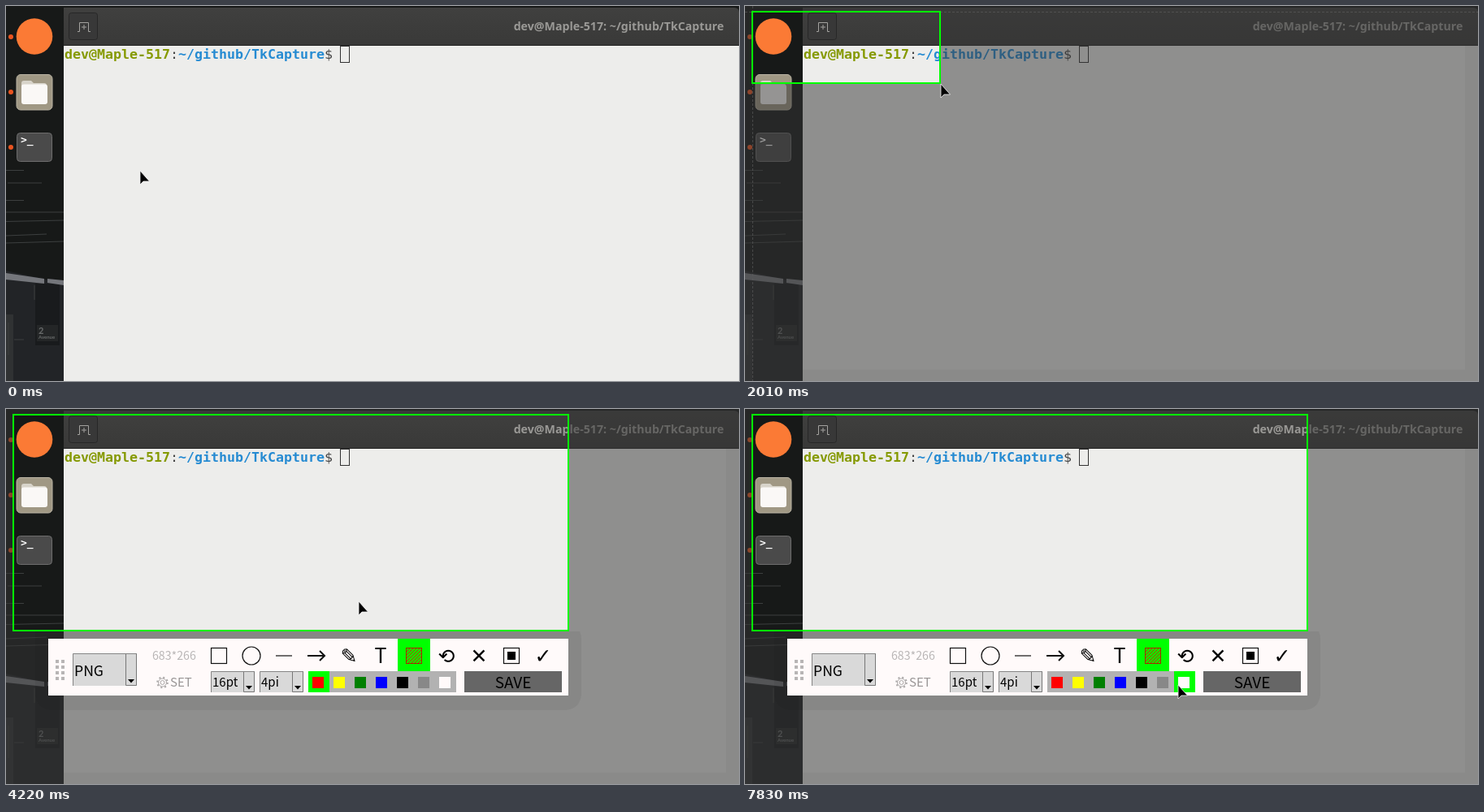
An HTML page that plays this animation: 902x462 px, repeating every 8000 ms.

```html
<!DOCTYPE html>
<html lang="en">
<head>
<meta charset="utf-8">
<title>Screen capture tool</title>
<style>
  html, body { margin: 0; width: 100%; height: 100%; overflow: hidden; background: #171918; }
  svg { display: block; width: 902px; height: 462px; }
  text { white-space: pre; }
  .mono { font: bold 16.61px "DejaVu Sans Mono", monospace; }
  .title { font: bold 14.2px "Noto Sans", sans-serif; }
  .ui { font-family: "Noto Sans CJK SC", "Noto Sans CJK JP", "Noto Sans", sans-serif; }
  .glyph { font: 25px "DejaVu Sans", sans-serif; text-anchor: middle; }
</style>
</head>
<body>
<svg viewBox="0 0 902 462">
  <defs>
    <linearGradient id="bar" x2="0" y2="1">
      <stop stop-color="#40403f"/><stop offset="1" stop-color="#393938"/>
    </linearGradient>
    <pattern id="hatch" width="4" height="4" patternUnits="userSpaceOnUse">
      <path id="hatchLines" d="M-1 1L1-1M0 4L4 0M3 5L5 3" stroke="#000"/>
    </pattern>
  </defs>

  <!-- wallpaper and dock -->
  <rect width="902" height="462" fill="#171918"/>
  <path d="M0 326L71 342V462H0Z" fill="#222427"/>
  <path d="M36 342H66V418H36Z" fill="#191b1d"/>
  <path d="M0 380H9V462H0Z" fill="#303233"/>
  <path d="M0 202.5H22M2 218H44M0 239.5H22M0 254H71M0 265.5L71 264M0 283L50 281M0 292L71 290M35 344V362M3 390V430M10 411H22" stroke="#3c3f3f" fill="none"/>
  <path d="M0 329L47 336V342L0 337ZM51 336L71 338V344L51 341Z" fill="#74767b"/>
  <path d="M38 393H64V413H38Z" fill="#242627"/>
  <g fill="#696c6c" font-family="Lato, sans-serif" font-weight="bold">
    <text x="40" y="404" font-size="11">2</text><text x="40" y="410" font-size="6">Avenue</text>
  </g>
  <g fill="#e95420"><circle cx="6" cy="38" r="3"/><circle cx="6" cy="106" r="3"/><circle cx="6" cy="174" r="3"/></g>
  <circle cx="35" cy="37.5" r="22.3" fill="#fb7a35"/>
  <rect x="13" y="84.500" width="44" height="43.500" rx="5" fill="#a09884" stroke="#b9b3a3"/>
  <path d="M19 106V95Q19 92 22 92H31L34 95H47Q50 95 50 98V106Z" fill="#d8d4ca"/>
  <rect x="19" y="96.500" width="32" height="24.500" rx="3" fill="#faf8f6"/>
  <rect x="13.500" y="156.500" width="43" height="35" rx="4" fill="#4a4a4a" stroke="#6d6d6d"/>
  <text x="18" y="169" fill="#fff" style="font:bold 13px 'DejaVu Sans Mono',monospace">&gt;_</text>

  <!-- terminal -->
  <path d="M71 2H896Q902 2 902 8V49H71Z" fill="url(#bar)"/>
  <path d="M71 48.500H902" stroke="#222"/>
  <rect x="77.500" y="8.500" width="35" height="33" rx="3" fill="#383838" stroke="#272727"/>
  <path d="M88 31.500H90.500V20.500H101.500V31.500H104M93 26H99M96 23V29" fill="none" stroke="#a3a29f"/>
  <text class="title" x="754" y="30" text-anchor="middle" fill="#9a9996">dev@Maple-517: ~/github/TkCapture</text>
  <rect x="71" y="49" width="831" height="413" fill="#ededeb"/>
  <text class="mono" x="72" y="65"><tspan fill="#859900">dev@Maple-517</tspan><tspan fill="#444" font-weight="400">:</tspan><tspan fill="#268bd2">~/github/TkCapture</tspan><tspan fill="#444" font-weight="400">$</tspan></text>
  <rect x="411.500" y="49.500" width="11" height="20" fill="none" stroke="#333"/>

  <!-- capture overlay -->
  <path id="edge" d="M902 49V462H71V460H528L542 457H888Q897 457 897 446V49Z" fill="#dcdcda"/>
  <path id="cross" fill="none" stroke="#8a8a8a" stroke-opacity=".6" stroke-dasharray="3 2"/>
  <g id="shade">
    <path id="dim" fill="#353535" fill-opacity=".51" fill-rule="evenodd"/>
    <path d="M886 49H902V462H71V448H886Z" fill-opacity=".035"/>
  </g>
  <path id="toolShadow" d="M36 274H706Q708 278 708 284V352Q706 371 686 371H58Q38 371 36 352Z" fill-opacity=".06"/>
  <rect id="frame" fill="none" stroke="#0f0" stroke-width="2"/>
  <g id="handles" fill="#0f0"></g>
  <g id="tip">
    <path d="M357 272Q357 254 375 254H393Q411 254 411 272Z" fill-opacity=".1"/>
    <path d="M362 266H405V283H362Z" fill="#d9d9d9"/>
    <path d="M362 282.500H405" stroke="#777"/>
  </g>

  <g id="toolbar" class="ui">
    <rect x="52" y="283" width="640" height="70" fill="#fffafa"/>
    <path d="M63 309V334M70 309V334" stroke="#b8b5b5" stroke-width="4" stroke-dasharray="4 3"/>
    <g id="combos"></g>
    <text x="180" y="309" font-size="14.2" fill="#b9b6b6">683*266</text>
    <g fill="none" stroke="#aaa7a7">
      <circle cx="192.500" cy="337" r="5"/><circle cx="192.500" cy="337" r="2.500"/>
      <circle cx="192.500" cy="337" r="6.300" stroke-width="2" stroke-dasharray="2 2.950"/>
    </g>
    <text x="202" y="342" font-size="15" fill="#989595">SET</text>
    <path id="picked" d="M482 283H522V323H482Z" fill="#0f0"/>
    <g fill="none" stroke="#111" stroke-width="1.200">
      <rect x="252.500" y="294.500" width="19" height="19"/>
      <circle cx="302" cy="304" r="11"/>
      <path d="M332 304H352"/>
      <path id="arrow" d="M371 304H392M386 298L392 304L386 310" stroke-width="2"/>
      <rect x="612.500" y="294.500" width="19" height="19"/>
    </g>
    <path d="M617 299H627V309H617Z"/>
    <rect id="hatchBox" x="492.500" y="294.500" width="19" height="19" fill="url(#hatch)" stroke="#000"/>
    <text x="461" y="313" font-size="25" font-weight="500" text-anchor="middle">T</text>
    <text class="glyph" x="422" y="313">✎</text>
    <text class="glyph" x="542" y="313">⟲</text>
    <text class="glyph" x="582" y="313">✕</text>
    <text class="glyph" x="661" y="313">✓</text>
    <path d="M372 323H554V349H372Z" fill="#b2b2b2"/>
    <rect id="chosen" y="323" width="26" height="26" fill="#0f0"/>
    <g id="swatches"></g>
    <path d="M564 323H684V349H564Z" fill="#666"/>
    <text x="624" y="344" font-size="19" text-anchor="middle">SAVE</text>
  </g>
  <path id="pointer" d="M0 0V17L4 13H11.500Z" stroke="#f4f4f4" stroke-width=".8"/>
</svg>

<script>
const $ = id => document.getElementById(id);
const set = (id, attrs) => Object.entries(attrs).forEach(([k, v]) => $(id).setAttribute(k, v));
const show = (id, on) => set(id, { visibility: on ? "visible" : "hidden" });

const LEFT = 9, TOP = 7, RIGHT = 692, BOTTOM = 273;

const combo = (x, y, w, h, label, size, baseline) => `
  <rect x="${x}" y="${y}" width="${w}" height="${h}" fill="#d9d9d9"/>
  <path d="M${x + .5} ${y + h}V${y + .5}H${x + w}" fill="none" stroke="#858585"/>
  <path d="M${x + w - 13.5} ${y + 1}V${y + h - .5}H${x + w - .5}V${y + 1}" fill="none" stroke="#777"/>
  <path d="M${x + w - 11} ${y + h - 8}h8l-4 4.500z"/>
  <text x="${x + 2}" y="${baseline}" font-size="${size}">${label}</text>`;
$("combos").innerHTML = combo(82, 301, 79, 40, "PNG", 17.6, 329)
  + combo(252, 323, 54, 26, "16pt", 15, 342) + combo(312, 323, 54, 26, "4pi", 15, 342);

$("swatches").innerHTML = ["red", "yellow", "green", "blue", "black", "#888", "#fffafa"]
  .map((c, i) => `<rect x="${377 + 26 * i}" y="330" width="14" height="14" fill="${c}"/>`).join("");

for (const x of [LEFT, 350, RIGHT]) for (const y of [TOP, 140, BOTTOM])
  if (x !== 350 || y !== 140) $("handles").innerHTML += `<circle cx="${x}" cy="${y}" r="7.500"/>`;

const spans = [[610, 3210], [3620, 4420], [4830, 7830]];
const snap = t => spans.reduce((s, [a, b]) =>
  t < a ? s : Math.min(b, a + Math.floor((t - a) / 200) * 200), 0);

// time, x, y of the pointer tip
const route = [
  [0, 165, 203], [410, 165, 203], [1610, 16, 10], [1810, 16, 10], [2410, 691, 267],
  [2810, 693, 274], [3210, 511, 246], [3820, 505, 320], [4020, 503, 316], [4420, 364, 157],
  [4630, 364, 157], [5230, 350, 74], [5430, 300, 58], [5830, 165, 61], [6830, 371, 293],
  [7030, 409, 328], [7630, 533, 340], [8000, 533, 340]
];
function pointerAt(t) {
  const i = route.findIndex(p => p[0] > t);
  const [t0, x0, y0] = route[i - 1], [t1, x1, y1] = route[i];
  const k = (t - t0) / (t1 - t0);
  return [Math.round(x0 + (x1 - x0) * k), Math.round(y0 + (y1 - y0) * k)];
}

function draw() {
  const t = snap(performance.now() % 8000);
  const [x, y] = pointerAt(t);
  set("pointer", { transform: `translate(${x} ${y})` });

  const crossX = t < 1810 ? x - 6.5 : 9.5, crossY = t < 1810 ? y - 2.5 : 7.5;
  set("cross", { d: `M${crossX} 0V462M0 ${crossY}H902` });
  show("cross", t >= 810 && t < 2810);
  show("edge", t >= 1410 && t < 2010);

  const dragging = t >= 2010, ready = t >= 3010, hatching = t >= 4020;
  const right = t < 2810 ? x - 1 : RIGHT, bottom = t < 2810 ? y - 1 : BOTTOM;
  show("shade", dragging);
  show("frame", dragging);
  if (dragging) {
    set("dim", { d: `M0 0H902V462H0ZM${LEFT} ${TOP}H${right}V${bottom}H${LEFT}Z` });
    set("frame", { x: LEFT, y: TOP, width: right - LEFT, height: bottom - TOP });
  }

  show("toolbar", ready);
  show("toolShadow", ready);
  show("handles", ready && !hatching);
  show("picked", ready && hatching);
  set("hatchBox", { stroke: hatching ? "#a52a00" : "#000" });
  set("hatchLines", { stroke: hatching ? "#c03000" : "#000" });
  set("chosen", { x: t >= 7830 ? 528 : 372 });
  show("tip", t === 6830);
  requestAnimationFrame(draw);
}
draw();
</script>
</body>
</html>
```
